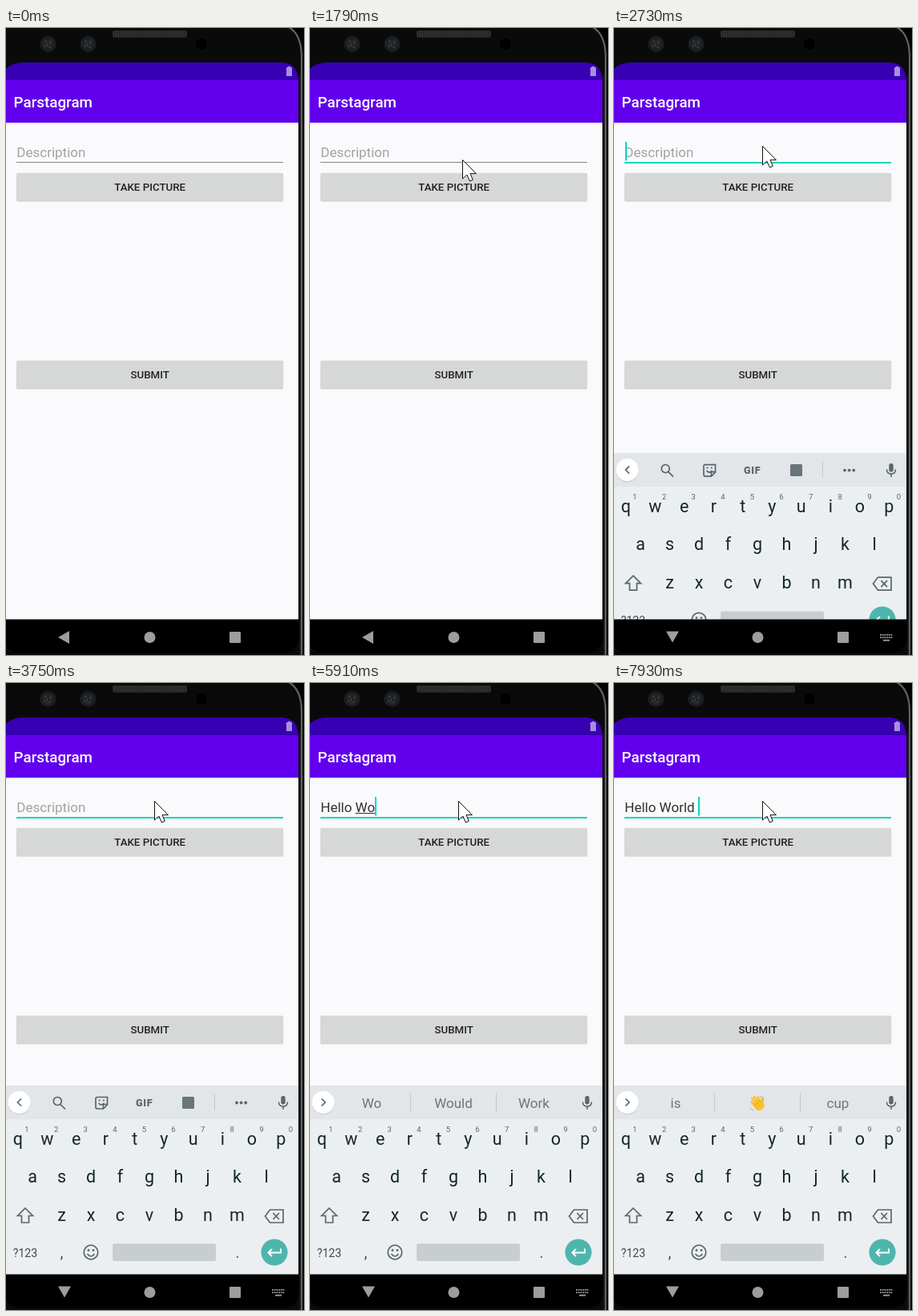
Recreate the animation shown at these times as an HTML page. Size 372 by 782 pixels, loop 8000 ms.

```html
<!DOCTYPE html>
<html lang="en">
<head>
<meta charset="utf-8">
<title>Post form</title>
<style>
html, body { margin: 0; width: 100%; height: 100%; overflow: hidden; background: #000; }
svg { display: block; font-family: Roboto, sans-serif; }
text { white-space: pre; }
.mid { text-anchor: middle; }
.line { fill: none; stroke: #59666c; stroke-width: 1.7; }
</style>
</head>
<body>
<svg id="stage" width="372" height="782" viewBox="0 0 372 782"></svg>
<script>
const LOOP = 8000, TEXT_X = 13.3, FONT = 17;
const TEAL = '#05d6c6', ICON = '#59666c';

const rect = (x, y, w, h, fill, more = '') =>
  `<rect x="${x}" y="${y}" width="${w}" height="${h}" fill="${fill}" ${more}/>`;
const circle = (x, y, r, fill, more = '') =>
  `<circle cx="${x}" cy="${y}" r="${r}" fill="${fill}" ${more}/>`;
const label = (x, y, size, fill, str, more = '') =>
  `<text x="${x}" y="${y}" font-size="${size}" fill="${fill}" ${more}>${str}</text>`;
const path = (d, more = 'class="line"') => `<path d="${d}" ${more}/>`;
const repeat = (n, fn) => Array.from({ length: n }, (_, i) => fn(i)).join('');

function lens(x) {
  return circle(x, 20, 10, '#1b1e21') + circle(x, 20, 6.5, '#222629') +
    [[-3, -3], [3, -2], [-1, 1], [2, 4], [-4, 3]].map(([a, b]) => circle(x + a, 20 + b, 0.8, '#5b6063')).join('');
}

function phone() {
  return rect(0, 0, 372, 782, '#0a0a0a') +
    path('M353 0Q369 8 369 34V782H372V0Z', 'fill="#000"') +
    path('M353 -1Q369 8 369 36V782', 'fill="none" stroke="#626262" stroke-width="2.2"') +
    path('M366.5 60V782', 'stroke="#1b1b1b" stroke-width="1.5"') +
    lens(52.5) + lens(102.5) + circle(244, 20, 7, '#000') +
    rect(133, 3, 93, 9, '#282828', 'rx="2"') +
    repeat(31, i => rect(134 + i * 3, 4, 1, 7, '#323232'));
}

function button(y, str) {
  return rect(12.6, y + 1, 334, 35, '#000', 'rx="2" opacity=".06"') +
    rect(13, y + 0.8, 333, 34.4, '#000', 'rx="2" opacity=".1"') +
    rect(13, y - 0.3, 333, 34.4, '#d6d7d7', 'rx="1.5"') +
    label(179.7, y + 22, 13.3, '#222223', str, 'class="mid" font-weight="500"');
}

function app() {
  return rect(0, 65, 365, 673, '#fafafc') +
    path('M0 66V51Q8 43 21 43H343Q364 43 365 65V66Z', 'fill="#3700b3"') +
    rect(0, 118, 365, 1, '#000', 'opacity=".13"') + rect(0, 119, 365, 1, '#000', 'opacity=".05"') +
    rect(0, 65, 365, 53, '#6200ee') +
    rect(350, 49, 7, 11, '#a78fdc') + rect(352, 47.8, 3, 1.5, '#a78fdc') +
    label(9.6, 99, 18.8, '#fff', 'Parstagram', 'font-weight="500"') +
    label(TEXT_X, 160.5, FONT, '#a2a2a4', 'Description', 'id="hint"') +
    label(TEXT_X, 160.5, FONT, '#303032', '', 'id="typed"') +
    rect(0, 162, 0, 1, '#303032', 'id="compose"') +
    rect(13, 167, 333, 1, '#858588') +
    rect(13, 167, 333, 2, TEAL, 'id="focus"') +
    rect(0, 142, 2, 23.5, TEAL, 'id="caret"') +
    button(181, 'TAKE PICTURE') + button(415, 'SUBMIT');
}

function tools() {
  return `<g id="tools">` +
    circle(64.3, 521.5, 5, 'none', 'class="line"') + path('M68 525.5L74 531.5') +
    path('M126.5 516.5V526L121.5 531H114Q112 531 112 529V518.5Q112 516.5 114 516.5Z') +
    path('M126.5 525.5H121.5V531M115.5 524Q119 528 122.5 524') +
    circle(116.5, 520.5, 1.1, ICON) + circle(121.8, 520.5, 1.1, ICON) +
    label(172.7, 527.7, 12.6, ICON, 'GIF', 'class="mid" font-weight="900" letter-spacing=".7"') +
    rect(220, 516, 15, 15, '#69757a', 'rx="1.5"') +
    rect(260, 513, 1, 20, '#c3c9cc') +
    [288, 293.6, 299.2].map(x => circle(x, 523.5, 1.9, ICON)).join('') +
    path('M19 518.5L14.5 523L19 527.5') + `</g>`;
}

function wave() {
  const skin = '#fbc02d';
  return `<g id="wave"><g transform="rotate(-38 179 524)">` +
    path('M174.2 526V518.2M177.5 525V515.2M180.8 525V515.6M184 526V518.6',
      `fill="none" stroke="${skin}" stroke-width="2.7" stroke-linecap="round"`) +
    path('M185 527L188 523.4', `stroke="${skin}" stroke-width="2.7" stroke-linecap="round"`) +
    path('M172.9 523H185.4V528Q185 533.5 179 533.5Q173 533.5 172.9 528Z', `fill="${skin}"`) +
    path('M175.8 521V526M179.2 520V526M182.4 521V526', 'stroke="#e59b18" stroke-width=".7"') + `</g>` +
    path('M182.5 515.5Q185.5 516.2 187 519M170 529.5Q171 532 174 532.8',
      'fill="none" stroke="#8fa9b5" stroke-width=".9"') + `</g>`;
}

function suggestions() {
  return `<g id="sugs">` + [77, 179, 279.5].map((x, i) =>
    label(x, 530, 17, '#6a757a', '', `id="sug${i}" class="mid"`)).join('') +
    rect(125, 512, 1, 23, '#c3c9cc') + rect(232, 512, 1, 23, '#c3c9cc') +
    path('M14.5 518.5L19 523L14.5 527.5') + wave() + `</g>`;
}

function keys() {
  const row = (chars, x, y) => [...chars].map((c, i) =>
    label(x + i * 36.5, y, 21.5, '#14262e', c, 'class="mid"')).join('');
  return row('qwertyuiop', 14.8, 575.5) + row('asdfghjkl', 33, 623) + row('zxcvbnm', 69.5, 670.5) +
    [...'1234567890'].map((c, i) => label(26 + i * 36.6, 560, 9.5, '#59666c', c, 'class="mid"')).join('') +
    label(24, 715.5, 14.2, '#3c4a50', '?123', 'class="mid"') +
    label(69.5, 716.5, 18.5, '#3c4a50', ',', 'class="mid"') + label(289, 717, 18.5, '#3c4a50', '.', 'class="mid"') +
    path('M24 655L33.5 664.5H28.5V673H19.5V664.5H14.5Z') +
    path('M329.5 657H346V673H329.5L323.5 665ZM333.5 661L341 669M341 661L333.5 669') +
    circle(106, 710, 8.8, 'none', 'class="line"') + path('M101.5 712Q106 718 110.5 712') +
    circle(103, 707.5, 1.4, ICON) + circle(109, 707.5, 1.4, ICON) +
    rect(133, 699.3, 129, 21.7, '#c8cdd0', 'rx="2"') +
    circle(335, 710, 16.6, '#4db6ac') +
    path('M343 705.5V710.5H328M332 706L327.5 710.5L332 715', 'fill="none" stroke="#fff" stroke-width="2"');
}

function keyboard() {
  return `<g id="board">` + rect(0, 502, 365, 236, '#eceff1') + rect(0, 502, 365, 42, '#e2e6e9') +
    circle(16.5, 524, 14.3, '#000', 'opacity=".1"') + circle(16.5, 523, 14, '#fff') +
    tools() + suggestions() +
    rect(343.3, 515, 5.4, 10.5, ICON, 'rx="2.7"') +
    path('M340.5 522.5Q340.5 528 346 528T351.5 522.5M346 528V532', `fill="none" stroke="${ICON}" stroke-width="1.6"`) +
    keys() + `</g>`;
}

function nav() {
  const grey = '#9d9d9d';
  return rect(0, 760, 366, 22, '#0a0a0a') +
    path('M0 737.5H366V758Q365 780 344 780H20Q6 780 0 770Z', 'fill="#000"') +
    path('M-8 0L6 -8V8Z', `id="back" fill="${grey}"`) +
    circle(179.5, 760, 7, grey) + rect(279, 753, 14, 14, grey, 'rx="1"') +
    `<g id="ime">` + repeat(12, i => rect(332 + (i % 6) * 2.7, i < 6 ? 756 : 759.3, 1.8, 1.8, grey)) +
    rect(336, 762.8, 8, 1.8, grey) + `</g>`;
}

const pointer = path('M.5 .5V24L5.8 19L9.5 27L13.3 25.3L10 17.6H17.4Z',
  'id="pointer" fill="#fff" stroke="#111" stroke-width="1"');

document.getElementById('stage').innerHTML = phone() + app() + keyboard() + nav() + pointer;

const el = {};
document.querySelectorAll('[id]').forEach(n => el[n.id] = n);
const set = (id, attrs) => { for (const k in attrs) el[id].setAttribute(k, attrs[k]); };
const show = (id, on) => set(id, { visibility: on ? 'inherit' : 'hidden' });
const clamp = v => Math.max(0, Math.min(1, v));
const smooth = v => v * v * (3 - 2 * v);

// time, field text, start of the word being composed (-1: none), suggestions (* bold, @ wave)
const edits = [
  [4900, 'H', 0, 'He,Hey,Hello'],
  [5050, 'He', 0, 'He,Hey,Hello'],
  [5130, 'Hel', 0, 'Hel,*Hello,Help'],
  [5280, 'Hell', 0, 'Hell,*Hello,Help'],
  [5440, 'Hello', 0, 'Hello,Hell,Hellos'],
  [5660, 'Hello ', -1, 'Hello,Hell,Hellos'],
  [5740, 'Hello W', 6, 'W,We,Was'],
  [5910, 'Hello Wo', 6, 'Wo,Would,Work'],
  [5980, 'Hello Wor', 6, 'Wor,Work,Working'],
  [6150, 'Hello Work', 6, 'Work,Working,Works'],
  [7450, 'Hello Wor', 6, 'Wor,Work,Working'],
  [7620, 'Hello Worl', 6, 'Worl,*World,Worlds'],
  [7700, 'Hello World', 6, "World,World's,Worlds"],
  [7850, 'Hello World ', -1, "World,World's,Worlds"],
  [7930, 'Hello World ', -1, 'is,@,cup']
];
const blinks = [[2260, 2770], [3280, 3750], [4290, 4740], [4900, 6700], [7160, LOOP]];

const pen = document.createElement('canvas').getContext('2d');
function widthOf(str) {
  pen.font = '100px Roboto, sans-serif';
  return pen.measureText(str).width * FONT / 100;
}

function pointerAt(t) {
  if (t < 420) return null;
  if (t < 800) {
    const p = Math.min(2, Math.floor((t - 420) / 75)) / 2;
    return [316 - 26 * p, 743 - 248 * p];
  }
  if (t < 1650) {
    const p = smooth(Math.min(11, Math.floor((t - 800) / 76) + 1) / 11), q = 1 - p;
    const bend = (a, b, c) => q * q * a + 2 * p * q * b + p * p * c;
    return [bend(290, 285, 198), bend(495, 190, 177)];
  }
  if (t < 1790) return [195, 172];
  if (t < 1870) return [190, 164];
  return t < 1960 ? [187, 155] : [185, 147];
}

function drawField(t) {
  const edit = edits.filter(e => e[0] <= t).pop();
  const [, str, from, list] = edit || [0, '', -1, ',,'];
  el.typed.textContent = str;
  show('hint', !str);
  const end = TEXT_X + widthOf(str);
  const start = from < 0 ? end : TEXT_X + widthOf(str.slice(0, from));
  set('compose', { x: start, width: end - start });
  set('caret', { x: Math.round(end + 0.3) });
  show('caret', blinks.some(([a, b]) => t >= a && t < b));
  set('focus', { opacity: t < 2110 ? 0 : t < 2260 ? 0.6 : 1 });

  show('tools', !edit);
  show('sugs', edit);
  show('wave', list.includes('@'));
  list.split(',').forEach((word, i) => {
    const bold = word[0] === '*';
    el['sug' + i].textContent = word.replace(/[*@]/, '');
    set('sug' + i, { fill: bold ? '#000' : '#6a757a', 'font-weight': bold ? 700 : 400 });
  });
}

function render(t) {
  const at = pointerAt(t);
  show('pointer', at);
  if (at) set('pointer', { transform: `translate(${at.map(Math.round)})` });
  drawField(t);
  const rise = clamp((t - 2600) / 200);
  show('board', rise > 0);
  set('board', { transform: `translate(0 ${236 * (1 - rise) ** 2})` });
  show('ime', t >= 2500);
  const turn = smooth(clamp((t - 2505) / 200));
  set('back', { transform: `translate(73 ${760 - 1.5 * turn}) rotate(${-90 * turn})` });
}

function tick() {
  render(performance.now() % LOOP);
  requestAnimationFrame(tick);
}
tick();
</script>
</body>
</html>
```
